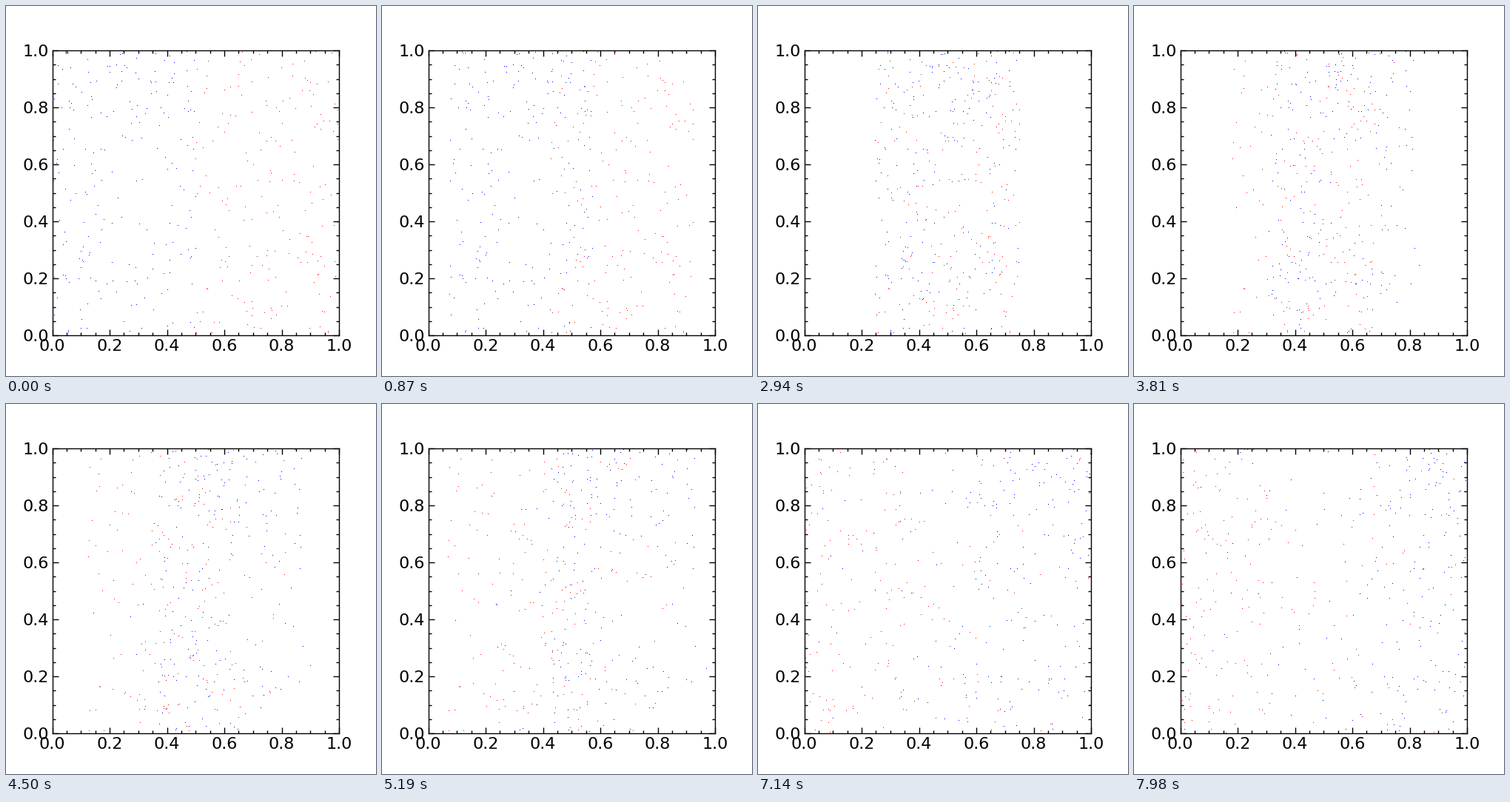
These frames come from a looping animation (500 px wide and 500 px high, 8 s). A matplotlib script:

```python
import numpy as np
import matplotlib.pyplot as plt
from matplotlib.animation import FuncAnimation
from matplotlib.ticker import AutoMinorLocator

COUNT = 400
FRAMES = 267
LOOP_MS = 8000
SPEED = 0.0025    # box widths per frame
RADIUS = 0.0015

plt.rcParams.update({"font.family": "DejaVu Sans", "font.size": 16})


def bounce(pos, vel):
    """Turn particles that have left the unit box back inwards."""
    vel[pos < 0] = np.abs(vel[pos < 0])
    vel[pos > 1] = -np.abs(vel[pos > 1])


def collide(pos, vel):
    """Elastic collisions of equal discs that overlap and approach."""
    gap = pos[:, None] - pos[None]
    near = np.triu((gap ** 2).sum(axis=2) < (2 * RADIUS) ** 2, 1)
    for i, j in np.argwhere(near):
        d = pos[i] - pos[j]
        closing = (vel[i] - vel[j]) @ d
        if closing < 0:
            push = closing / (d @ d) * d
            vel[i] -= push
            vel[j] += push


def simulate():
    rng = np.random.default_rng(12)
    pos = rng.random((COUNT, 2))
    left = pos[:, 0] < 0.5
    vel = np.zeros((COUNT, 2))
    vel[:, 0] = np.where(left, SPEED, -SPEED)
    path = [pos.copy()]
    for _ in range(FRAMES - 1):
        bounce(pos, vel)
        collide(pos, vel)
        pos += vel
        path.append(pos.copy())
    return left, np.array(path)


left, path = simulate()

fig = plt.figure(figsize=(5, 5), dpi=100, facecolor="white")
ax = fig.add_axes([0.125, 0.11, 0.775, 0.77])
ax.set(xlim=(0, 1), ylim=(0, 1))
for axis in (ax.xaxis, ax.yaxis):
    axis.set_minor_locator(AutoMinorLocator(4))
ax.tick_params(which="both", direction="in", top=True, right=True, width=1)
ax.tick_params(which="major", length=6)
ax.tick_params(which="minor", length=3)
for spine in ax.spines.values():
    spine.set_linewidth(1)

groups = [
    (ax.plot([], [], ",", color="blue")[0], left),
    (ax.plot([], [], ",", color="red")[0], ~left),
]


def update(frame):
    for dots, mask in groups:
        dots.set_data(path[frame, mask, 0], path[frame, mask, 1])
    return [dots for dots, _ in groups]


anim = FuncAnimation(fig, update, frames=FRAMES, interval=LOOP_MS / FRAMES,
                     repeat=True, repeat_delay=0)
plt.show()
```
